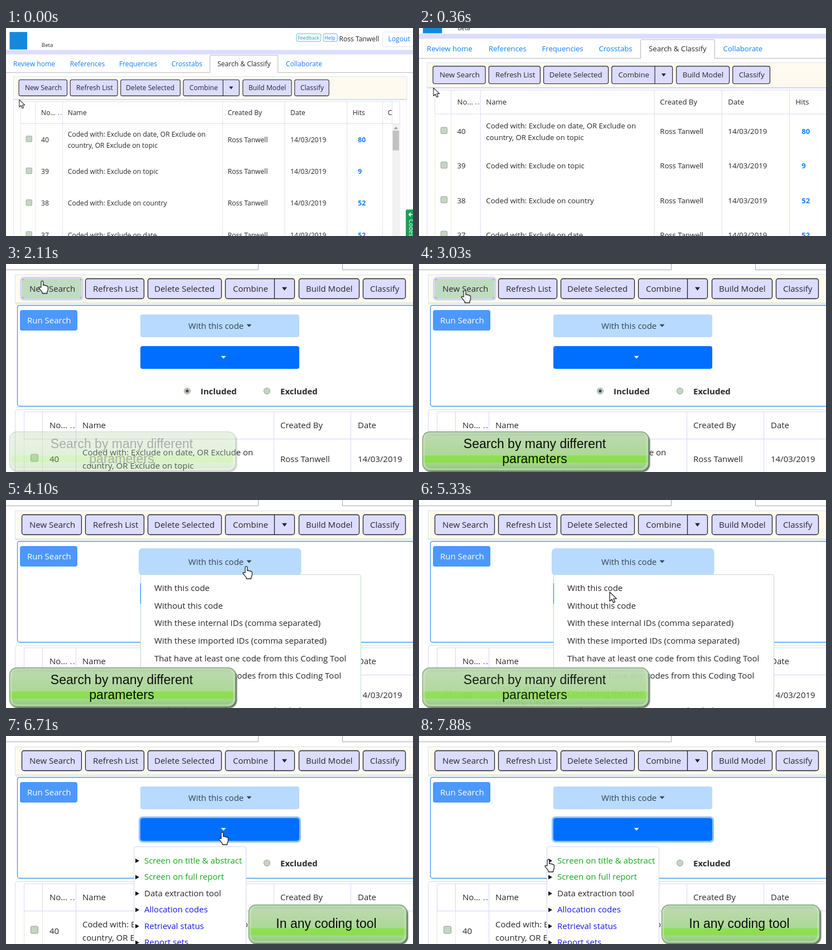
An HTML page that plays this animation: 730 px wide and 375 px high, repeating every 8000 ms.

```html
<!DOCTYPE html>
<html lang="en">
<head>
<meta charset="utf-8">
<title>Search and classify walkthrough</title>
<style>
html, body { margin: 0; width: 100%; height: 100%; overflow: hidden; background: #fff; }
svg { display: block; width: 730px; height: 375px; overflow: hidden; font: 15px "Open Sans", "Noto Sans", sans-serif; fill: #26262c; }
.b { font-weight: 700; }
.link { fill: #0f7fff; }
.small { font-size: 11px; }
.line { fill: none; stroke: #d6d6fa; }
.rule { fill: none; stroke: #e6e9d6; }
.btn { fill: #dcdcff; stroke: #20202c; stroke-width: 1.3; }
.box { fill: #c3d6c3; stroke: #9a9a9a; }
.pale { fill: #b8daff; }
.blue { fill: #006fff; }
.white { fill: #fff; }
.ring { fill: none; stroke-width: 3; }
.green { fill: #12a818; }
.navy { fill: #1616f0; }
.note text { font: 23px "Liberation Sans", Arial, sans-serif; fill: #0a0f08; text-anchor: middle; }

/* one shared 8 s clock */
.zoom, .cursor, .note { animation: 8s linear infinite; }
.list, .panel, .menu, .tree, .hover, .focus, .hand, .arrow { animation: 8s step-end infinite; }

.zoom { transform-origin: 0 375px; animation-name: zoom; }
@keyframes zoom {
  0% { transform: scale(.8084); animation-timing-function: cubic-bezier(.87, 0, .13, 1); }
  9.4%, 100% { transform: none; }
}
.cursor { animation-name: move; animation-timing-function: ease-in-out; }
@keyframes move {
  0%, 10.9% { transform: translate(29.5px, 71px); }
  14.25%, 26.4% { transform: translate(65px, 30px); }
  33.1%, 37.4% { transform: translate(77px, 46px); }
  43.1%, 56.6% { transform: translate(431px, 119px); }
  61.6%, 66.6% { transform: translate(342px, 166px); }
  76.3%, 87.6% { transform: translate(388px, 173px); }
  93% { transform: translate(300px, 248px); }
  98.5%, 100% { transform: translate(232px, 222px); }
}
.hand { animation-name: hand; }
@keyframes hand {
  0%, 38.6%, 58.3% { opacity: 0; }
  12%, 41%, 68.1%, 100% { opacity: 1; }
}
.arrow { animation-name: arrow; }
@keyframes arrow {
  0%, 38.6%, 58.3% { opacity: 1; }
  12%, 41%, 68.1%, 100% { opacity: 0; }
}
.hover { animation-name: hover; }
@keyframes hover { 0% { opacity: 0; } 12% { opacity: 1; } 38.4%, 100% { opacity: 0; } }
.focus { animation-name: focus; }
@keyframes focus { 0% { opacity: 0; } 23.3% { opacity: 1; } 49.7%, 100% { opacity: 0; } }
.list { animation-name: push; }
@keyframes push { 0% { transform: none; } 23.3%, 100% { transform: translateY(191px); } }
.panel { animation-name: open; }
@keyframes open { 0% { opacity: 0; } 23.3%, 100% { opacity: 1; } }
.menu { animation-name: menu; }
@keyframes menu { 0% { opacity: 0; } 49.7% { opacity: 1; } 68.1%, 100% { opacity: 0; } }
.tree { animation-name: tree; }
@keyframes tree { 0% { opacity: 0; } 77.6%, 100% { opacity: 1; } }
.first { animation-name: first; }
@keyframes first { 0%, 22.6% { opacity: 0; } 33.8%, 66.1% { opacity: 1; } 76%, 100% { opacity: 0; } }
.second { animation-name: second; }
@keyframes second { 0%, 71.5% { opacity: 0; } 83%, 100% { opacity: 1; } }
</style>
</head>
<body>
<svg viewBox="0 0 730 375">
<defs>
  <linearGradient id="gloss" x2="0" y2="1">
    <stop offset="0" stop-color="#a5c79c"/>
    <stop offset=".12" stop-color="#bbd9ae"/>
    <stop offset=".6" stop-color="#acd896"/>
    <stop offset=".62" stop-color="#8edf50"/>
    <stop offset=".78" stop-color="#8edb54"/>
    <stop offset=".81" stop-color="#a2d88c"/>
    <stop offset="1" stop-color="#90c27e"/>
  </linearGradient>
  <filter id="soft" x="-5%" y="-10%" width="110%" height="125%"><feGaussianBlur stdDeviation="1.3"/></filter>
  <path id="caret" d="M-4.5-2.2h9L0 2.6Z"/>
  <path id="twig" d="M0-4 7 0 0 4Z" fill="#111"/>
  <rect id="check" class="box" x="44.500" y="-8.500" width="13" height="13" rx="2"/>
</defs>

<g class="zoom">
  <!-- page header -->
  <rect x="8" y="-80" width="39" height="39" fill="#1688dc"/>
  <text x="79" y="-47" font-size="12">Beta</text>
  <g fill="none" stroke="#3d9bff">
    <rect x="644.500" y="-76" width="54" height="17" rx="3" stroke="#3aaebc"/>
    <rect x="704" y="-76" width="31" height="17" rx="3"/>
  </g>
  <text class="small" x="647" y="-63.500" fill="#1f9aa8">Feedback</text>
  <g class="link">
    <text class="small" x="707" y="-63.500">Help</text>
    <text x="848" y="-59">Logout</text>
  </g>
  <text x="739" y="-59">Ross Tanwell</text>
  <rect class="line" x="835.500" y="-80" width="90" height="33" rx="3"/>
  <rect x="0" y="-40" width="910" height="10" fill="#dcdcff"/>
  <path d="M0 10.500H452.500V-26a2 2 0 0 1 2-2H601.500a2 2 0 0 1 2 2V10.500H910" fill="none" stroke="#a5a5aa"/>
  <g class="link">
    <text x="16" y="-4">Review home</text>
    <text x="142" y="-4">References</text>
    <text x="251" y="-4">Frequencies</text>
    <text x="367" y="-4">Crosstabs</text>
    <text x="621" y="-4">Collaborate</text>
  </g>
  <text x="469" y="-4">Search &amp; Classify</text>

  <!-- toolbar -->
  <rect x="16.500" y="19.500" width="873" height="51" fill="#fffaf0" stroke="#d3e4f1"/>
  <path d="M16 70.500H890" stroke="#b4d6b4"/>
  <g class="btn">
    <rect x="28.500" y="26.500" width="107" height="36" rx="4"/>
    <rect x="142.500" y="26.500" width="105" height="36" rx="4"/>
    <rect x="254.500" y="26.500" width="132" height="36" rx="4"/>
    <rect x="393.500" y="26.500" width="124" height="36" rx="4"/>
    <path d="M481.500 26.500v36"/>
    <rect x="525.500" y="26.500" width="108" height="36" rx="4"/>
    <rect x="640.500" y="26.500" width="76" height="36" rx="4"/>
  </g>
  <rect class="hover" x="28.500" y="26.500" width="107" height="36" rx="4" fill="#c0dcc0" stroke="#20202c"/>
  <rect class="focus" x="27" y="25" width="110" height="39" rx="5" fill="none" stroke="#d6d6f2" stroke-width="4"/>
  <text x="42" y="50">New Search</text>
  <text x="156" y="50">Refresh List</text>
  <text x="266" y="50">Delete Selected</text>
  <text x="407" y="50">Combine</text>
  <text x="538" y="50">Build Model</text>
  <text x="653" y="50">Classify</text>
  <use href="#caret" transform="translate(499.500 44.500) scale(1 1.300)"/>

  <!-- search list -->
  <g class="list">
    <rect class="line" x="16.500" y="71.500" width="873" height="500" rx="4"/>
    <path class="line" d="M32.500 124V75.500H873.500V124M32 124.500H873M65.500 75v49M856.500 75v49M125.500 75v400M480.500 75v400M618.500 75v400M756.500 75v400M835.500 75v400"/>
    <path class="rule" d="M32.500 125v350M65.500 125v350M873.500 125v350"/>
    <text x="78" y="105">No…</text>
    <path d="M115.500 104h2m3.500 0h2" stroke="#7f8ad0" stroke-width="2"/>
    <text x="137" y="105">Name</text>
    <text x="492" y="105">Created By</text>
    <text x="631" y="105">Date</text>
    <text x="769" y="105">Hits</text>
    <text x="847" y="105">C</text>
    <g transform="translate(0 160.500)">
      <use href="#check"/>
      <text x="78" y="5">40</text>
      <text x="137" y="-6.500">Coded with: Exclude on date, OR Exclude on</text>
      <text x="137" y="17.500">country, OR Exclude on topic</text>
      <text x="492" y="5">Ross Tanwell</text>
      <text x="631" y="5">14/03/2019</text>
      <text class="b link" x="781" y="5">80</text>
    </g>
    <g transform="translate(0 231.500)">
      <use href="#check"/>
      <text x="78" y="5">39</text>
      <text x="137" y="5">Coded with: Exclude on topic</text>
      <text x="492" y="5">Ross Tanwell</text>
      <text x="631" y="5">14/03/2019</text>
      <text class="b link" x="781" y="5">9</text>
    </g>
    <g transform="translate(0 302.500)">
      <use href="#check"/>
      <text x="78" y="5">38</text>
      <text x="137" y="5">Coded with: Exclude on country</text>
      <text x="492" y="5">Ross Tanwell</text>
      <text x="631" y="5">14/03/2019</text>
      <text class="b link" x="781" y="5">52</text>
    </g>
    <g transform="translate(0 373.500)">
      <use href="#check"/>
      <text x="78" y="5">37</text>
      <text x="137" y="5">Coded with: Exclude on date</text>
      <text x="492" y="5">Ross Tanwell</text>
      <text x="631" y="5">14/03/2019</text>
      <text class="b link" x="781" y="5">52</text>
    </g>
    <rect x="857" y="125" width="16" height="350" fill="#f1f1f1"/>
    <path d="M860.500 136.500h9l-4.500-5Z" fill="#999"/>
    <rect x="858" y="140" width="14" height="44" fill="#c1c1c1"/>
  </g>

  <!-- side tab -->
  <rect x="887" y="316" width="40" height="90" rx="4" fill="#1f9d55"/>
  <path d="M902 327h-8m4-4-4 4 4 4" fill="none" stroke="#fff" stroke-width="2"/>
  <text class="white" font-size="13" transform="translate(894 338) rotate(90)">Codes</text>

  <!-- search form -->
  <g class="panel">
    <rect x="20.500" y="74.500" width="860" height="182" rx="4" fill="#fff" stroke="#3b97f7" stroke-width="1.300"/>
    <rect x="25" y="83" width="103" height="37" rx="4" fill="#4d98ff"/>
    <text class="white" x="38" y="107">Run Search</text>
    <rect class="pale" x="241" y="91" width="285" height="41" rx="4"/>
    <rect class="menu pale" x="238" y="87" width="291.500" height="49" rx="7"/>
    <g fill="#34424f">
      <text x="327" y="117">With this code</text>
      <use href="#caret" x="436" y="111"/>
    </g>
    <rect class="blue" x="241" y="148" width="285" height="41" rx="4"/>
    <rect class="tree ring" x="239.500" y="146.500" width="288" height="44" rx="5" stroke="#8fc2ff"/>
    <use class="white" href="#caret" x="390" y="168"/>
    <circle class="box" cx="325" cy="229" r="5.500"/>
    <circle cx="325" cy="229" r="2.700" fill="#444"/>
    <circle class="box" cx="468" cy="229" r="5.500"/>
    <g class="b">
      <text x="349" y="235">Included</text>
      <text x="492" y="235">Excluded</text>
    </g>
  </g>

  <g class="menu">
    <rect x="241.500" y="134.500" width="395" height="300" rx="3" fill="#fff" stroke="#bddcc6"/>
    <path d="M241.500 150v37" stroke="#006fff"/>
    <text x="266" y="164">With this code</text>
    <text x="266" y="196">Without this code</text>
    <text x="266" y="227">With these internal IDs (comma separated)</text>
    <text x="266" y="259">With these imported IDs (comma separated)</text>
    <text x="266" y="291">That have at least one code from this Coding Tool</text>
    <text x="266" y="322">That don't have any codes from this Coding Tool</text>
    <text x="266" y="354">Containing this text</text>
    <text x="266" y="385">With at least one document uploaded</text>
  </g>

  <g class="tree">
    <rect x="229.500" y="199.500" width="201" height="250" rx="4" fill="#fff" stroke="#cfd3ee"/>
    <use href="#twig" x="232" y="225"/>
    <use href="#twig" x="232" y="254.500"/>
    <use href="#twig" x="232" y="284"/>
    <use href="#twig" x="232" y="313.500"/>
    <use href="#twig" x="232" y="343"/>
    <use href="#twig" x="232" y="372.500"/>
    <g class="green">
      <text x="248" y="230">Screen on title &amp; abstract</text>
      <text x="248" y="259">Screen on full report</text>
    </g>
    <text x="248" y="289">Data extraction tool</text>
    <g class="navy">
      <text x="248" y="318">Allocation codes</text>
      <text x="248" y="348">Retrieval status</text>
      <text x="248" y="377">Report sets</text>
    </g>
  </g>

  <!-- callouts -->
  <g class="note first">
    <rect x="8" y="305" width="406" height="70" rx="14" fill="#4c5548" filter="url(#soft)"/>
    <rect x="6.500" y="302.500" width="405" height="70" rx="13" fill="url(#gloss)" stroke="#82a67c" stroke-width="1.500"/>
    <rect class="ring" x="9" y="305" width="400" height="65" rx="11" stroke="#d3e8ca" stroke-opacity=".5"/>
    <text x="207.500" y="332">Search by many different</text>
    <text x="207.500" y="358.500">parameters</text>
  </g>
  <g class="note second">
    <rect x="437" y="307" width="284" height="69" rx="14" fill="#4c5548" filter="url(#soft)"/>
    <rect x="435.500" y="304.500" width="283" height="69" rx="13" fill="url(#gloss)" stroke="#82a67c" stroke-width="1.500"/>
    <rect class="ring" x="438" y="307" width="278" height="64" rx="11" stroke="#d3e8ca" stroke-opacity=".5"/>
    <text x="574.500" y="346">In any coding tool</text>
  </g>

  <g class="cursor" fill="#fff" stroke="#222" stroke-width="1.300" stroke-linejoin="round">
    <path class="arrow" d="M0 0V16.500l3.900-3.600 2.700 6.200 2.900-1.300-2.600-5.900H12.300Z"/>
    <g class="hand">
      <path transform="translate(-7 0)" d="M5 12V2.500a1.900 1.900 0 0 1 3.800 0V8.500a1.800 1.800 0 0 1 3.200 .6a1.800 1.800 0 0 1 3 .9a1.600 1.600 0 0 1 2.400 1.400V16c0 2-1.600 3.500-1.800 5.500v1.500H7.200V21.400C6 19 2.500 15.500 1.200 13.400c-.7-1.600 1-2.600 2.200-1.600Z"/>
    </g>
  </g>
</g>
</svg>
</body>
</html>
```
